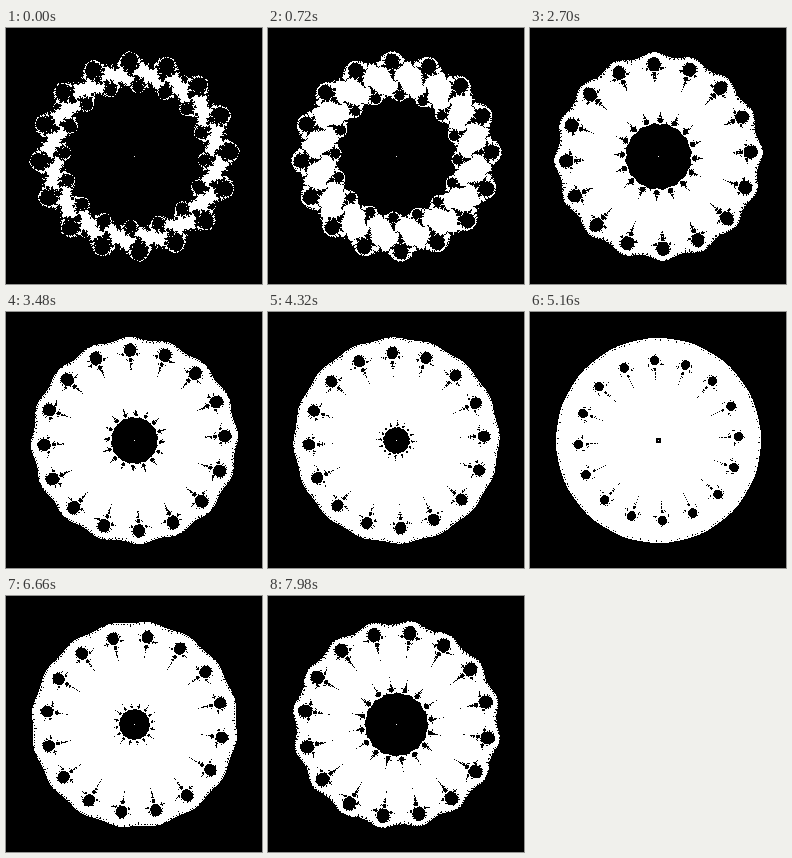
Recreate the animation shown at these times as an HTML page with a canvas. Size 256x256 px, loop 8 s.

```html
<!DOCTYPE html>
<html lang="en">
<head>
<meta charset="utf-8">
<title>Julia ring</title>
<style>
  html, body { margin: 0; width: 100%; height: 100%; overflow: hidden; background: #000; }
  canvas { display: block; width: 100vw; height: 100vh; image-rendering: pixelated; }
</style>
</head>
<body>
<canvas id="stage" width="256" height="256"></canvas>
<script>
// Filled Julia set of z^15 + c/z while c slides along the diagonal through 0.
const SIZE = 256, MID = SIZE / 2, SPAN = 2.5;
const LOOP = 8000, STEP = 60;
const MAX_ITER = 50, BAIL = 4;
const WHITE = 0xffffffff, BLACK = 0xff000000;

const ctx = document.getElementById('stage').getContext('2d');
const image = ctx.createImageData(SIZE, SIZE);
const pixels = new Uint32Array(image.data.buffer);

function stays(x, y, cx, cy) {
  for (let i = 0; i < MAX_ITER; i++) {
    const n = x * x + y * y;
    if (n > BAIL) return false;
    const x2 = x * x - y * y, y2 = 2 * x * y;
    const x3 = x2 * x - y2 * y, y3 = x2 * y + y2 * x;
    const x5 = x3 * x2 - y3 * y2, y5 = x3 * y2 + y3 * x2;
    const x10 = x5 * x5 - y5 * y5, y10 = 2 * x5 * y5;
    const px = (cx * x + cy * y) / n, py = (cy * x - cx * y) / n;
    x = x10 * x5 - y10 * y5 + px;
    y = x10 * y5 + y10 * x5 + py;
  }
  return x * x + y * y <= BAIL;
}

function plot(dx, dy) {
  pixels[(MID - dy) * SIZE + MID + dx] = WHITE;
}

// The set has 16-fold symmetry, so one quadrant is turned four times.
function draw(step) {
  const c = (step - 90) * 0.005, unit = SPAN / SIZE;
  pixels.fill(BLACK);
  plot(0, 0);
  for (let dy = 0; dy < MID; dy++) {
    for (let dx = 1; dx < MID; dx++) {
      if (!stays(dx * unit, dy * unit, c, c)) continue;
      plot(dx, dy);
      plot(-dy, dx);
      plot(-dx, -dy);
      plot(dy, -dx);
    }
  }
  ctx.putImageData(image, 0, 0);
}

const start = performance.now();
let shown = -1;

function tick() {
  const step = Math.floor((performance.now() - start) % LOOP / STEP);
  if (step !== shown) draw(shown = step);
  requestAnimationFrame(tick);
}
tick();
</script>
</body>
</html>
```
